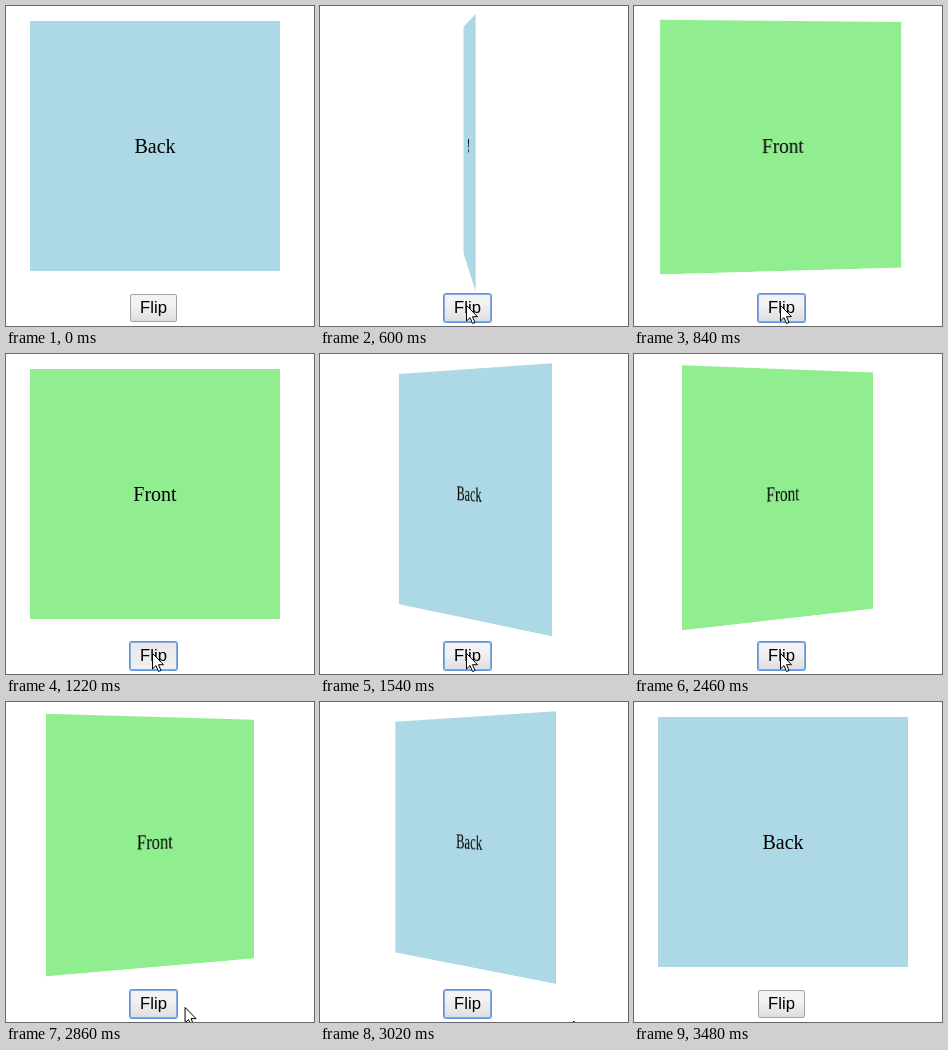
Animation, 308 px wide and 320 px high, one loop 3560 ms. Source, as an HTML page:

```html
<!DOCTYPE html>
<html lang="en">
<head>
<meta charset="utf-8">
<title>Card flip</title>
<style>
  html, body { margin: 0; width: 100%; height: 100%; overflow: hidden; background: #fff; }
  #stage {
    position: relative; width: 308px; height: 320px; overflow: hidden;
    perspective: 1250px; perspective-origin: 24px 77.5px;
  }
  #card {
    position: absolute; left: 24px; top: 15px; width: 250px; height: 250px;
    transform-style: preserve-3d;
  }
  .face {
    position: absolute; inset: 0; backface-visibility: hidden;
    font: 20px/250px "Liberation Serif", serif; text-align: center; color: #000;
  }
  .back { background: lightblue; }
  .front { background: lightgreen; transform: rotateY(180deg); }
  #button {
    position: absolute; left: 124px; top: 288px; width: 47px; height: 28px;
    box-sizing: border-box; border: 1px solid #a3a3a3; border-radius: 2px;
    background: linear-gradient(#f2f2f2 38%, #dedede);
    font: 16.67px/25px "Liberation Sans", Arial, sans-serif; text-align: center; color: #000;
  }
  #button.focus { border-color: #7fa9e0; box-shadow: 0 0 0 1px #5b97e6; }
  #button.pressed { background: linear-gradient(#e8e8e8, #f0f0f0); }
  #cursor { position: absolute; left: 0; top: 0; overflow: visible; }
</style>
</head>
<body>
<div id="stage">
  <div id="card">
    <div class="face back">Back</div>
    <div class="face front">Front</div>
  </div>
  <div id="button">Flip</div>
  <svg id="cursor" width="13" height="20">
    <path d="M.5 .5V16L4 12.6 6.5 18.5 9 17.5 6.5 11.7H11.5Z" fill="#fff" stroke="#000"/>
  </svg>
</div>
<script>
const LOOP = 3560, FLIP = 600;
const flips = [419, 1295, 2158, 2778];
// Screen refreshes: [start, interval, number of further refreshes]
const runs = [[0, 70, 0], [70, 78, 6], [600, 80, 6], [1220, 160, 0], [1380, 76, 6],
  [2080, 76, 6], [2620, 80, 5], [3080, 80, 3], [3480, 80, 0]];
const [card, button, cursor] = ['card', 'button', 'cursor'].map(id => document.getElementById(id));

const clamp = v => Math.min(1, Math.max(0, v));
const mix = (a, b, k) => a + (b - a) * k;

// cubic-bezier(.25, .1, .25, 1)
function ease(x) {
  let lo = 0, hi = 1;
  for (let i = 0; i < 24; i++) {
    const u = (lo + hi) / 2;
    if (.75 * u * (1 - u) + u ** 3 < x) lo = u; else hi = u;
  }
  return .3 * lo * (1 - lo) ** 2 + 3 * lo * lo * (1 - lo) + lo ** 3;
}

function refreshTime(t) {
  const [start, step, count] = runs.findLast(run => run[0] <= t);
  return start + step * Math.min(count, Math.floor((t - start) / step));
}

function draw(t) {
  const turn = flips.reduce((sum, start, i) =>
    sum + (i % 2 ? -1 : 1) * (t > start ? ease(clamp((t - start) / FLIP)) : 0), 0);
  card.style.transform = `rotateY(${-180 * clamp(turn)}deg)`;

  button.classList.toggle('focus', t >= flips[0] - 90 && t < 3480);
  button.classList.toggle('pressed', flips.some(start => t >= start - 90 && t < start));

  const enter = clamp((t - 70) / 230), leave = clamp((t - 2790) / 230);
  const x = mix(mix(185, 146, enter), 253, leave);
  const y = mix(mix(322, 299, enter), 318.5, leave);
  cursor.style.transform = `translate(${x}px, ${y}px)`;
  cursor.style.visibility = t >= 70 && t < 3080 ? 'visible' : 'hidden';
}

const origin = performance.now();
function tick() {
  draw(refreshTime((performance.now() - origin) % LOOP));
  requestAnimationFrame(tick);
}
tick();
</script>
</body>
</html>
```
